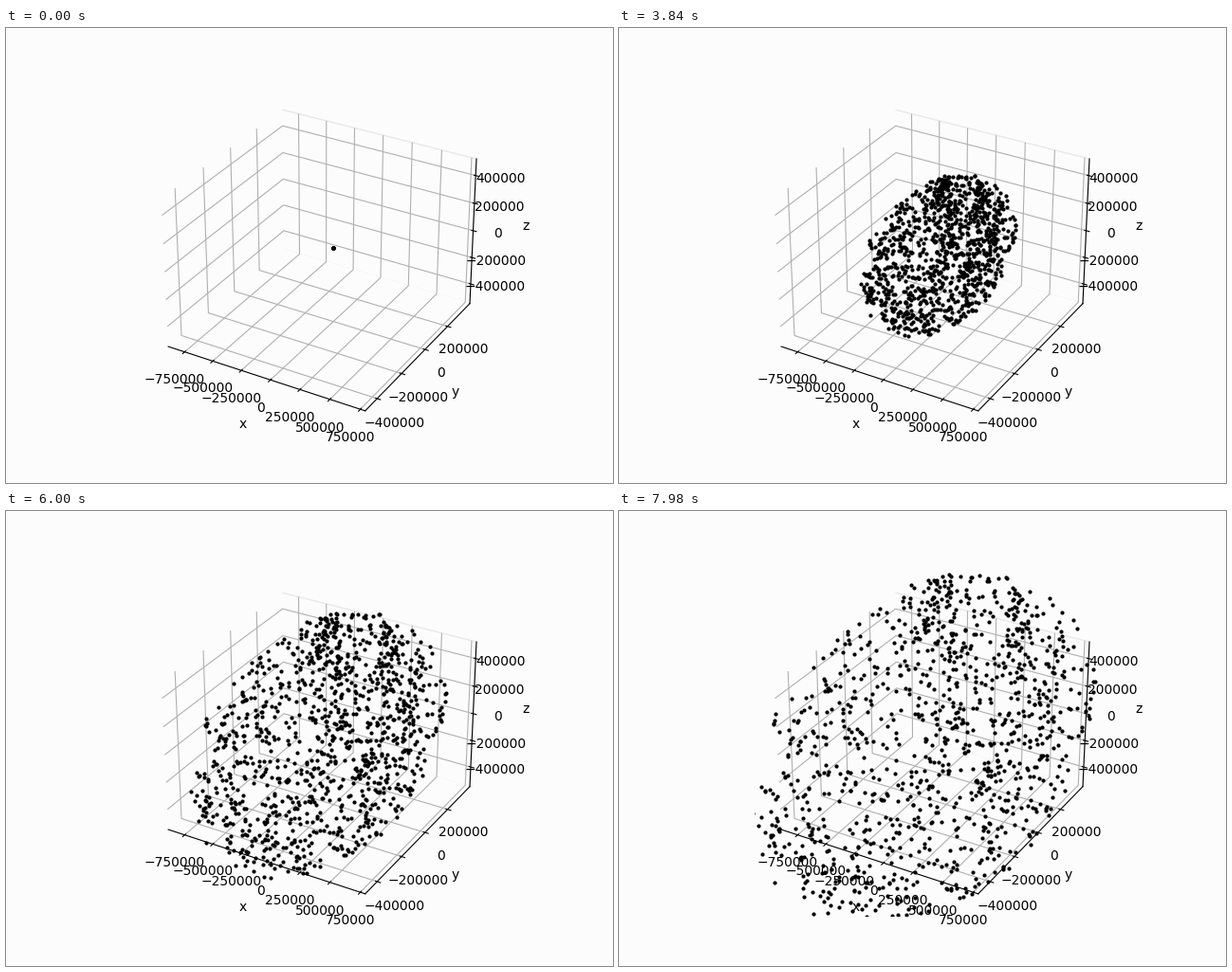
A matplotlib script that plays this animation: 640 by 480 pixels, repeating every 8 s.

```python
import numpy as np
import matplotlib.pyplot as plt
from matplotlib.animation import FuncAnimation

LOOP, INTERVAL, HOLD = 8000, 40, 60
PAPER = "#fcfcfc"
RADIUS = 105500          # growth of the ball per 840 ms
DRIFT = -0.11            # centre of the ball along y, in radii

rng = np.random.default_rng(12)


def ball(n):
    """Points in a ball, denser towards its skin."""
    p = rng.normal(size=(n, 3))
    p /= np.linalg.norm(p, axis=1)[:, None]
    return p * rng.random((n, 1)) ** 0.2


def arc(n, lon, low, high):
    """Points along a meridian of the ball."""
    lon = np.radians(rng.normal(lon, 5, n))
    lat = np.radians(rng.uniform(low, high, n))
    p = np.stack([np.cos(lat) * np.cos(lon), np.cos(lat) * np.sin(lon), np.sin(lat)], 1)
    return p * rng.uniform(0.85, 1, (n, 1))


points = np.vstack([ball(980), arc(75, 133, -50, 80), arc(65, 100, -60, 35)])
points[:, 1] += DRIFT
points *= RADIUS


def growth(ms):
    """Near-linear expansion with a slightly slow start."""
    k = ms / 840
    lag = 0.3 * np.sin(np.pi * (k / 7) ** 0.6) if k < 7 else 0
    return k - lag


fig = plt.figure(figsize=(6.4, 4.8), dpi=100, facecolor=PAPER)
ax = fig.add_subplot(projection="3d", facecolor=PAPER)
ax.set(xlabel="x", ylabel="y", zlabel="z",
       xlim=(-897e3, 789.4e3), ylim=(-494.8e3, 405.4e3), zlim=(-550e3, 518.6e3),
       xticks=np.arange(-750000, 750001, 250000),
       yticks=np.arange(-400000, 200001, 200000),
       zticks=np.arange(-400000, 400001, 200000))
for axis, edge in ((ax.xaxis, PAPER), (ax.yaxis, "#e8e8e8"), (ax.zaxis, PAPER)):
    axis.pane.set(facecolor=PAPER, edgecolor=edge, alpha=1)

dots, = ax.plot([], [], [], "ko", ms=2)


def update(i):
    step = (i * INTERVAL + HOLD // 3) // HOLD
    dots.set_data_3d(*(points * growth(step * HOLD)).T)
    return dots,


anim = FuncAnimation(fig, update, frames=LOOP // INTERVAL, interval=INTERVAL,
                     init_func=lambda: update(0), repeat=True, repeat_delay=0)
plt.show()
```
